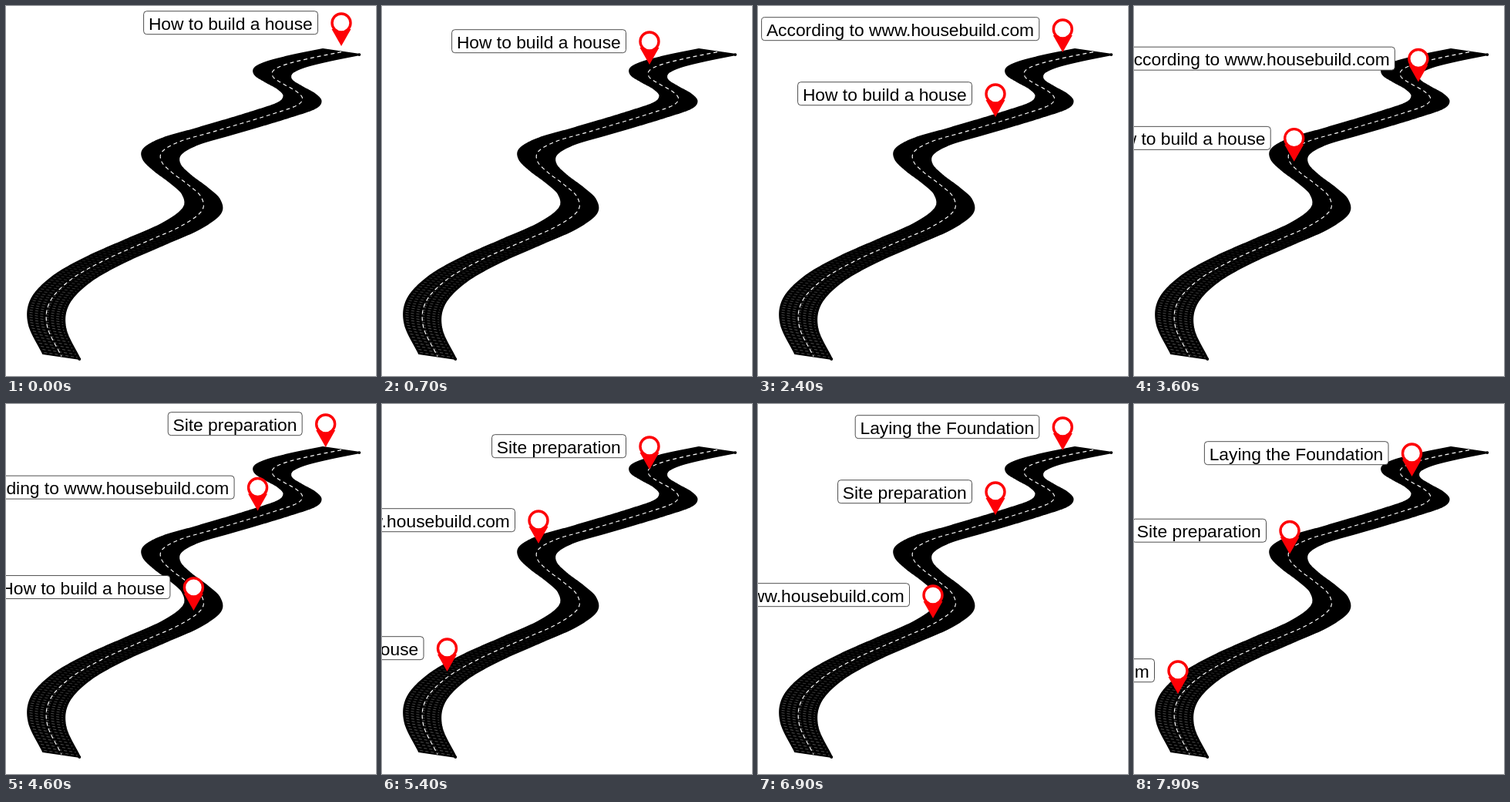
These frames come from a looping animation (480 px wide and 480 px high, 8000 ms). An HTML page with a canvas:

```html
<!DOCTYPE html>
<html lang="en">
<head>
<meta charset="utf-8">
<title>Road map</title>
<style>
  html, body { margin: 0; width: 100%; height: 100%; overflow: hidden; background: #fff; }
  canvas { display: block; }
</style>
</head>
<body>
<canvas id="stage" width="480" height="480"></canvas>
<script>
const ctx = document.getElementById('stage').getContext('2d');
const LOOP = 8000;
const HALF = { x: 24, y: 3.5 };   // half of the road's cross section
const LAST = 50;                  // steps a pin needs for the whole road
const PIN_LIFT = 9;               // pin tips float above their path
const ROAD_LIFT = 1.4;

// Path of the pins: one point for every second step.
const knots = [
  [435, 61], [395.3, 69], [363.5, 77], [347, 85], [347, 94], [360.5, 103],
  [376.5, 112], [384.5, 121.5], [376, 131], [344, 142], [308, 153], [267, 165],
  [226, 177], [203, 190], [202, 203.5], [216, 218], [236, 233], [253, 249],
  [254, 267], [227, 287], [182, 307], [128, 331], [84.5, 356], [57, 385],
  [53.5, 417], [72, 456]
];

const labels = [
  { text: 'How to build a house', start: 0 },
  { text: 'According to www.housebuild.com', start: 18 },
  { text: 'Site preparation', start: 36 },
  { text: 'Laying the Foundation', start: 54 }
];

function knot(i, axis) {
  const end = knots.length - 1;
  if (i < 0) return 2 * knots[0][axis] - knots[1][axis];
  if (i > end) return 2 * knots[end][axis] - knots[end - 1][axis];
  return knots[i][axis];
}

// Catmull-Rom spline through the knots
function roadPoint(step) {
  const i = Math.min(Math.floor(step / 2), knots.length - 2);
  const u = step / 2 - i;
  const [x, y] = [0, 1].map(axis => {
    const [a, b, c, d] = [-1, 0, 1, 2].map(k => knot(i + k, axis));
    return b + u / 2 * (c - a + u * (2 * a - 5 * b + 4 * c - d + u * (3 * (b - c) + d - a)));
  });
  return { x, y };
}

const centre = Array.from({ length: LAST * 8 + 1 }, (_, i) => roadPoint(i / 8));

function trace(side, points = centre) {
  for (const p of points) ctx.lineTo(p.x + side * HALF.x, p.y + side * HALF.y);
}

function strokeSide(side, width, color) {
  ctx.beginPath();
  trace(side);
  ctx.lineWidth = width;
  ctx.strokeStyle = color;
  ctx.stroke();
}

function drawRoad() {
  ctx.save();
  ctx.translate(0, -ROAD_LIFT);
  ctx.lineJoin = 'round';
  ctx.beginPath();
  trace(-1);
  trace(1, [...centre].reverse());
  ctx.closePath();
  ctx.fillStyle = ctx.strokeStyle = '#000';
  ctx.fill();
  ctx.lineWidth = 2;
  ctx.stroke();
  for (const p of [centre[0], centre[centre.length - 1]]) {
    ctx.beginPath();
    ctx.arc(p.x + HALF.x - 0.7, p.y + HALF.y, 1.9, 0, Math.PI * 2);
    ctx.fill();
  }

  // faint seams, stronger towards the viewer
  ctx.setLineDash([4, 3]);
  ctx.lineWidth = 0.7;
  for (let s = 38.5; s < LAST; s += 0.2) {
    const p = roadPoint(s);
    const shade = Math.min(0.45, (s - 38) * 0.045);
    ctx.strokeStyle = `rgba(255,255,255,${shade})`;
    ctx.beginPath();
    ctx.moveTo(p.x - HALF.x * 0.9, p.y - HALF.y * 0.9);
    ctx.lineTo(p.x + HALF.x * 0.9, p.y + HALF.y * 0.9);
    ctx.stroke();
  }

  ctx.setLineDash([5, 4]);
  strokeSide(0, 1.15, '#fff');
  ctx.restore();
}

function drawLabel(text, x, tip) {
  ctx.font = '22.8px "Liberation Sans", Arial, sans-serif';
  ctx.textAlign = 'right';
  const right = x - 30.5;
  const width = ctx.measureText(text).width + 13;
  ctx.beginPath();
  ctx.roundRect(right - width, tip - 45.3, width, 30, 4);
  ctx.fillStyle = '#fff';
  ctx.fill();
  ctx.lineWidth = 0.8;
  ctx.strokeStyle = '#222';
  ctx.stroke();
  ctx.fillStyle = '#000';
  ctx.fillText(text, right - 6.7, tip - 21.2);
}

function drawPin(x, tip) {
  ctx.fillStyle = ctx.strokeStyle = '#fd0006';
  ctx.beginPath();
  ctx.moveTo(x - 12.5, tip - 22);
  ctx.lineTo(x + 12.5, tip - 22);
  ctx.lineTo(x, tip);
  ctx.fill();
  ctx.beginPath();
  ctx.arc(x, tip - 30, 12, 0, Math.PI * 2);
  ctx.fillStyle = '#fff';
  ctx.fill();
  ctx.lineWidth = 3.4;
  ctx.stroke();
}

// Motion advances four steps in five ticks; the held tick shifts after 1.5 s.
function stepAt(time) {
  const tick = Math.floor(time / 100);
  return tick - Math.floor((tick < 15 ? tick + 1 : tick) / 5);
}

function draw(time) {
  const step = stepAt(time);
  ctx.fillStyle = '#fff';
  ctx.fillRect(0, 0, 480, 480);
  drawRoad();
  for (const { text, start } of labels) {
    const travelled = step - start;
    if (travelled < 0 || travelled > LAST) continue;
    const { x, y } = roadPoint(travelled);
    drawLabel(text, x, y - PIN_LIFT);
    drawPin(x, y - PIN_LIFT);
  }
}

const begin = performance.now();
function frame() {
  draw((performance.now() - begin) % LOOP);
  requestAnimationFrame(frame);
}
frame();
</script>
</body>
</html>
```
